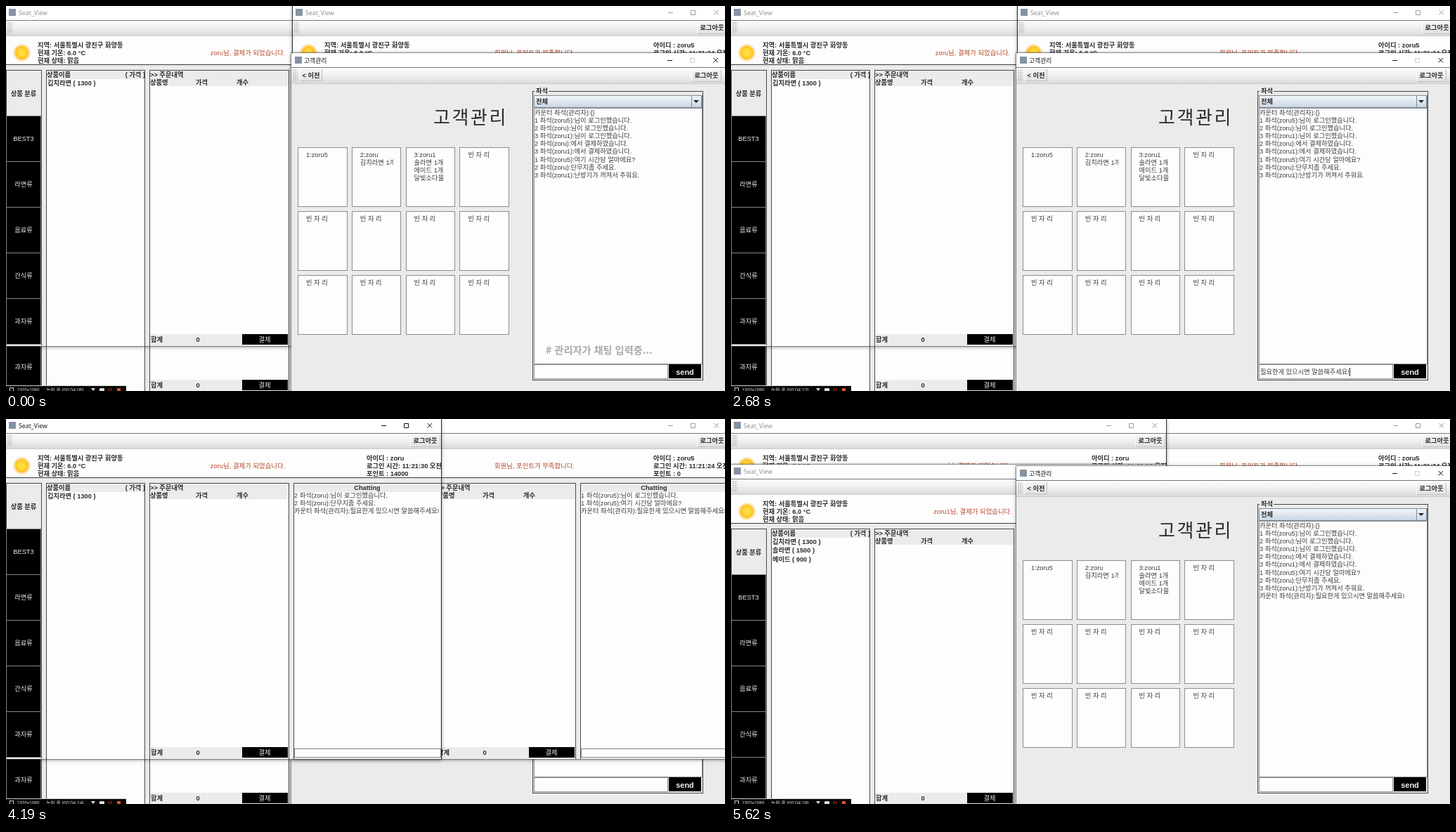
Animation of 1023x548 px, one loop 5.78 s. Source, as an HTML page:

```html
<!DOCTYPE html>
<html lang="ko">
<head>
<meta charset="utf-8">
<title>고객관리</title>
<style>
html, body { margin: 0; width: 100%; height: 100%; overflow: hidden; background: #ebebeb; }
#stage {
  position: absolute; left: 0; top: 0; width: 1023px; height: 548px; overflow: hidden;
  font: 9.25px/12px "Liberation Sans", "Noto Sans CJK KR", "Noto Sans CJK", sans-serif;
  white-space: pre; color: #3c3c3c;
}
#stage div { position: absolute; box-sizing: border-box; }
.win { background: #ebebeb; overflow: hidden; }
.frame { width: 619px; height: 484px; box-shadow: 0 0 1px 1px rgba(70,70,70,.5), 0 1px 6px rgba(0,0,0,.4); }
.client { box-shadow: 1px 0 #2c2c2c, -1px 0 #2c2c2c, 0 0 1px 1px rgba(70,70,70,.5), 0 1px 6px rgba(0,0,0,.4); }
.bar { background: #fff; }
.cap { font: 8.8px/12px "Open Sans", "Noto Sans CJK KR", sans-serif; color: #8b8b8b; }
.bar svg { position: absolute; left: 0; top: 0; fill: none; stroke: #9a9a9a; }
.on .cap { color: #111; }
.on svg { stroke: #111; }
.bar .off { stroke: #ccc; }
.logo { background: #8493a3; }
.tool { background: linear-gradient(#fbfbfb, #f1f1f1 45%, #dadada); border-top: 1px solid #777; border-bottom: 1px solid #ccc; }
.grip { background: radial-gradient(circle at 1px 1px, #aaa .6px, transparent .9px) 0 0 / 3px 3px; }
.btn { background: linear-gradient(#f4f4f4, #e2e2e2); border: 1px solid #c2c2c2; border-left-color: #fff; border-top-color: #fff; }
.white { background: #fdfdfd; }
.ink { background: #3a3a3a; }
.gap { background: #858585; }
.black { background: #000; }
.sides { border: solid #4a4a4a; border-width: 1px 1px 0; }
.edge { border: 1px solid #8d8d8d; }
.b { font-weight: 700; color: #2a2a2a; }
.c { transform: translateX(-50%); }
.r { transform: translateX(-100%); }
.light { color: #e8e8e8; }
.msg { color: #b5482a; font-size: 9.4px; }
.pick { background: #b4c9df; }
.sun { background: radial-gradient(circle, #ffdc40 0 4px, #ffc21c 8.5px, rgba(255,178,40,.55) 10px, rgba(255,200,100,.25) 12px, transparent 13.5px); }
.combo { background: linear-gradient(#f3f6f9, #c9d6e3); border: 1px solid #7a8a99; }
.head { font-size: 26px; line-height: 32px; letter-spacing: 2.6px; color: #2a2a2a; }
.hint { font: 700 14.2px/18px "Noto Sans CJK KR", "Noto Sans CJK", sans-serif; color: #a9a9a9; }
.rec { background: #050505; border-top: 1px solid #ccc; color: #d8d8d8; font-size: 6.9px; overflow: hidden; }
#entry i { display: inline-block; width: 1px; height: 12px; margin-right: -1px; background: #222; vertical-align: -3px; }
#entry u { text-decoration-thickness: 1px; text-decoration-color: #aaa; }
</style>
</head>
<body>
<div id="stage"></div>
<script>
const LOOP = 5780;
const REPLY = '필요한게 있으시면 말씀해주세요!';
const stage = document.getElementById('stage');

const box = (x, y, w, h, cls, inner = '') =>
  `<div class="${cls}" style="left:${x}px;top:${y}px;width:${w}px;height:${h}px">${inner}</div>`;
// y is the middle of the first line
const text = (x, y, str, cls = '', extra = '') =>
  `<div class="${cls}" style="left:${x}px;top:${y - 6}px;${extra}">${str}</div>`;
const lines = (x, y, list, pitch = 11.15, cls = '') =>
  list.map((s, i) => text(x, y + i * pitch, s, cls)).join('');

const titleBar = (title, dx, dy, maxCls = '') => box(0, 0, 619, 20, 'bar',
  box(4 + dx, 4 + dy, 10, 10, 'logo') + text(18, 9.5 + dy, title, 'cap') +
  `<svg width="619" height="20"><g transform="translate(${dx} ${dy})">
  <path d="M534 9.5h7M599.5 6l6.5 6.5m0-6.5l-6.5 6.5"/><path class="${maxCls}" d="M566.5 6.5h6v6h-6z"/></g></svg>`);

const toolBar = (dx = 0, dy = 0) => box(0, 20, 619, 23 + dy, 'tool') + box(2, 23 + dy, 7, 16, 'grip') +
  box(575 - dx, 22 + dy, 43, 18, 'btn') + text(596.5 - dx, 31 + dy, '로그아웃', 'c b');

function client({ id, x, y, name, login, point, msg, items, picked, chat }) {
  const menu = ['BEST3', '라면류', '음료류', '간식류', '과자류'];
  const body = titleBar('Seat_View', 0, 0) + toolBar() +
    box(0, 43, 619, 40, 'white') + box(0, 83, 619, 1, 'ink') +
    box(9, 53, 27, 27, 'sun') +
    lines(45, 56, ['지역: 서울특별시 광진구 화양동', '현재 기온: 6.0 °C', '현재 상태: 맑음'], 11.2, 'b') +
    text(344, 66.5, msg, 'msg c') +
    lines(513, 56, ['아이디 : ' + name, `로그인 시간: ${login} 오전`, '포인트 : ' + point], 11.2, 'b') +
    box(0, 91, 51, 392, 'sides') + text(25, 124.5, '상품 분류', 'c b') +
    box(0, 156, 50, 326, 'gap') +
    menu.map((m, i) => box(1, 157 + i * 65, 48, 64, 'black') +
      text(25, 188.5 + i * 65, m, 'c light')).join('') +
    box(57, 91, 141, 394, 'sides') + box(58, 104, 139, 380, 'white') +
    text(58, 98, '상품이름', 'b') + text(198, 98, '( 가격 )', 'b r') +
    (picked ? box(58, 103, 139, 12, 'pick') : '') +
    lines(59, 109.5, items, 12.7, 'b') +
    box(204, 91, 199, 394, 'sides') + box(205, 114, 197, 353, 'white') +
    text(205, 98, '&gt;&gt; 주문내역', 'b') +
    text(205, 109, '상품명', 'b') + text(270, 109, '가격', 'b') + text(328, 109, '개수', 'b') +
    text(206, 475, '합계', 'b') + text(270.5, 475, '0', 'b') +
    box(336, 467, 65, 15, 'black') + text(368, 475, '결제', 'c light') +
    box(409, 91, 211, 394, 'sides') + box(410, 104, 208, 364, 'white') +
    text(514, 98, 'Chatting', 'c b') + lines(410, 109, chat) +
    box(410, 469, 209, 13, 'white edge');
  return `<div id="${id}" class="frame client" style="left:${x}px;top:${y}px">${box(0, 0, 619, 484, 'win', body)}</div>`;
}

function admin() {
  const orders = [['1:zoru5'], ['2:zoru', '김치라면 1개'], ['3:zoru1', '솔라면 1개', '에이드 1개', '달빛소다물']];
  let seats = '';
  for (let i = 0; i < 12; i++) {
    const list = orders[i] || ['빈 자 리'];
    seats += box(415 + (i % 4) * 76.8, 201 + Math.floor(i / 4) * 91, 70.5, 84.5, 'white edge',
      box(11, 0, 47.5, 80, 'win white', lines(0, 9.5, list, 11)));
  }
  const log = ['카운터 좌석(관리자):{}', '1 좌석(zoru5):님이 로그인했습니다.', '2 좌석(zoru):님이 로그인했습니다.',
    '3 좌석(zoru1):님이 로그인했습니다.', '2 좌석(zoru):에서 결제하였습니다.', '3 좌석(zoru1):에서 결제하였습니다.',
    '1 좌석(zoru5):여기 시간당 얼마에요?', '2 좌석(zoru):단무지좀 주세요.', '3 좌석(zoru1):난방기가 꺼져서 추워요.'];
  const content = box(418, 89, 32, 18, 'btn') + text(434, 98.5, '&lt; 이전', 'c b') +
    text(608, 149, '고객관리', 'head') + seats +
    `<div style="left:749px;top:121px;width:243px;height:412px;border:1px solid #444"></div>` +
    box(752, 116, 20, 10, 'win') + text(754, 120.5, '좌석', 'b') +
    box(751, 127, 240, 18, 'combo') + text(754, 136, '전체', 'b') + box(975, 127, 15, 18, 'combo') +
    `<div style="left:978px;top:134px;border:solid transparent;border-width:4px 4px 0;border-top-color:#222"></div>` +
    box(751, 145, 240, 365, 'white edge') + lines(752, 151.7, log) +
    `<div id="sent">${text(752, 252, '카운터 좌석(관리자):' + REPLY)}</div>` +
    `<div id="hint">${text(768, 486, '# 관리자가 채팅 입력중...', 'hint')}</div>` +
    box(751, 510, 191, 21, 'white edge') + text(753, 521, '<span id="entry"></span>') +
    box(943, 510, 46, 20, 'black') + text(966, 521, 'send', 'c b', 'font-size:11px;color:#eee');
  const body = titleBar('고객관리', 1, 1, 'off') + toolBar(6, 1) +
    `<div style="left:-406px;top:-67px">${content}</div>`;
  return `<div id="admin" class="frame" style="left:406px;top:67px">${box(0, 0, 619, 484, 'win', body)}</div>`;
}

const chatOf = (seat, name, said) =>
  [`${seat} 좌석(${name}):님이 로그인했습니다.`, `${seat} 좌석(${name}):${said}`, '카운터 좌석(관리자):' + REPLY];

stage.innerHTML = [
  { id: 'seat3', x: 0, y: 65, name: 'zoru1', login: '11:21:24', point: 14900, msg: 'zoru1님, 결제가 되었습니다.',
    items: ['김치라면 ( 1300 )', '솔라면 ( 1500 )', '에이드 ( 900 )'], chat: chatOf(3, 'zoru1', '난방기가 꺼져서 추워요.') },
  { id: 'seat2', x: 0, y: 0, name: 'zoru', login: '11:21:30', point: 14000, msg: 'zoru님, 결제가 되었습니다.',
    items: ['김치라면 ( 1300 )'], chat: chatOf(2, 'zoru', '단무지좀 주세요.') },
  { id: 'seat1', x: 408, y: 0, name: 'zoru5', login: '11:21:24', point: 0, msg: '회원님, 포인트가 부족합니다.', picked: true,
    items: ['별라면 ( 2000 )', '검은국수 ( 2500 )', '볶음면 ( 1500 )', '솔라면 ( 1500 )', '김치라면 ( 1300 )'],
    chat: chatOf(1, 'zoru5', '여기 시간당 얼마에요?') }
].map(client).join('') + admin() +
  `<div style="left:0;top:0;z-index:9">${box(0, 540, 171, 8, 'rec',
    `<div style="left:5px;top:2px;width:6px;height:6px;border:1px solid #ccc"></div>` +
    text(16, 5.5, '1920x1080', '', 'font-size:6.3px') + text(57, 5.5, '<span id="clock"></span>') +
    `<div style="left:121px;top:3px;border:solid transparent;border-width:4px 3px 0;border-top-color:#ddd"></div>` +
    `<div style="left:133px;top:3px;width:7px;height:6px;background:#ddd;border-radius:1px"></div>` +
    `<div style="left:146px;top:3px;width:4px;height:6px;border:solid #c43a20;border-width:0 1.5px"></div>` +
    `<div style="left:158px;top:3px;width:5px;height:6px;background:#e0561e"></div>`)}</div>`;

// stacking order, back to front
const SCENES = [
  [0, 'seat3 seat2 seat1 admin'],
  [3650, 'seat3 seat2 admin seat1'],
  [4010, 'seat3 admin seat1 seat2'],
  [4840, 'admin seat1 seat2 seat3'],
  [5350, 'seat1 seat2 seat3 admin']
];
const TICKS = [160, 660, 1180, 1690, 2200, 2680, 3190, 3700, 4200, 4740, 4900, 5270];
const CARET = [[2760, 3000], [3240, 3460], [5350, 5620]];

// Korean input: the stages each syllable passes through while it is composed
const STROKES = 'ㅍ피필,ㅇ요욯,하한,ㄱ게, ,ㅇ이있,ㅇ으읏,시심,며면, ,ㅁ마말,ㅆ쓰씀,ㅎ해핮,주줏,세셍,요,!'.split(',');
const keys = STROKES.flatMap((stages, i) => [...stages].map(ch => [REPLY.slice(0, i), ch]));
// [keys, first, last]
const BURSTS = [[1, 190, 190], [12, 370, 930], [12, 1000, 1560], [1, 1660, 1660],
  [1, 1780, 1780], [8, 1920, 2450], [1, 2500, 2500], [1, 2680, 2680]];
const keyTimes = BURSTS.flatMap(([n, a, b]) =>
  Array.from({ length: n }, (_, i) => a + (n > 1 ? (b - a) * i / (n - 1) : 0)));

const $ = id => document.getElementById(id);
const passed = (list, t) => list.filter(v => v <= t).length;

function entryAt(t) {
  const n = passed(keyTimes, t);
  if (t >= 2760 || !n) return CARET.some(([a, b]) => t >= a && t < b) ? '<i></i>' : '';
  const [done, ch] = keys[n - 1];
  return /[ !]/.test(ch) ? done + ch + '<i></i>' : `${done}<i></i><u>${ch}</u>`;
}

let shown = '';
function draw(t) {
  const order = SCENES[passed(SCENES.map(s => s[0]), t) - 1][1];
  const entry = entryAt(t);
  const clock = `녹화 중 [00:04:${String(6 + passed(TICKS, t)).padStart(2, '0')}]`;
  const sent = t >= 2760, hint = t < 650;
  const state = [order, entry, clock, sent, hint].join('|');
  if (state === shown) return;
  shown = state;
  order.split(' ').forEach((id, i) => {
    $(id).style.zIndex = i + 1;
    $(id).classList.toggle('on', i === 3);
  });
  $('entry').innerHTML = entry;
  $('clock').textContent = clock;
  $('sent').style.display = sent ? '' : 'none';
  $('hint').style.display = hint ? '' : 'none';
}

const start = performance.now();
function loop() {
  draw((performance.now() - start) % LOOP);
  requestAnimationFrame(loop);
}
draw(0);
requestAnimationFrame(loop);
</script>
</body>
</html>
```
